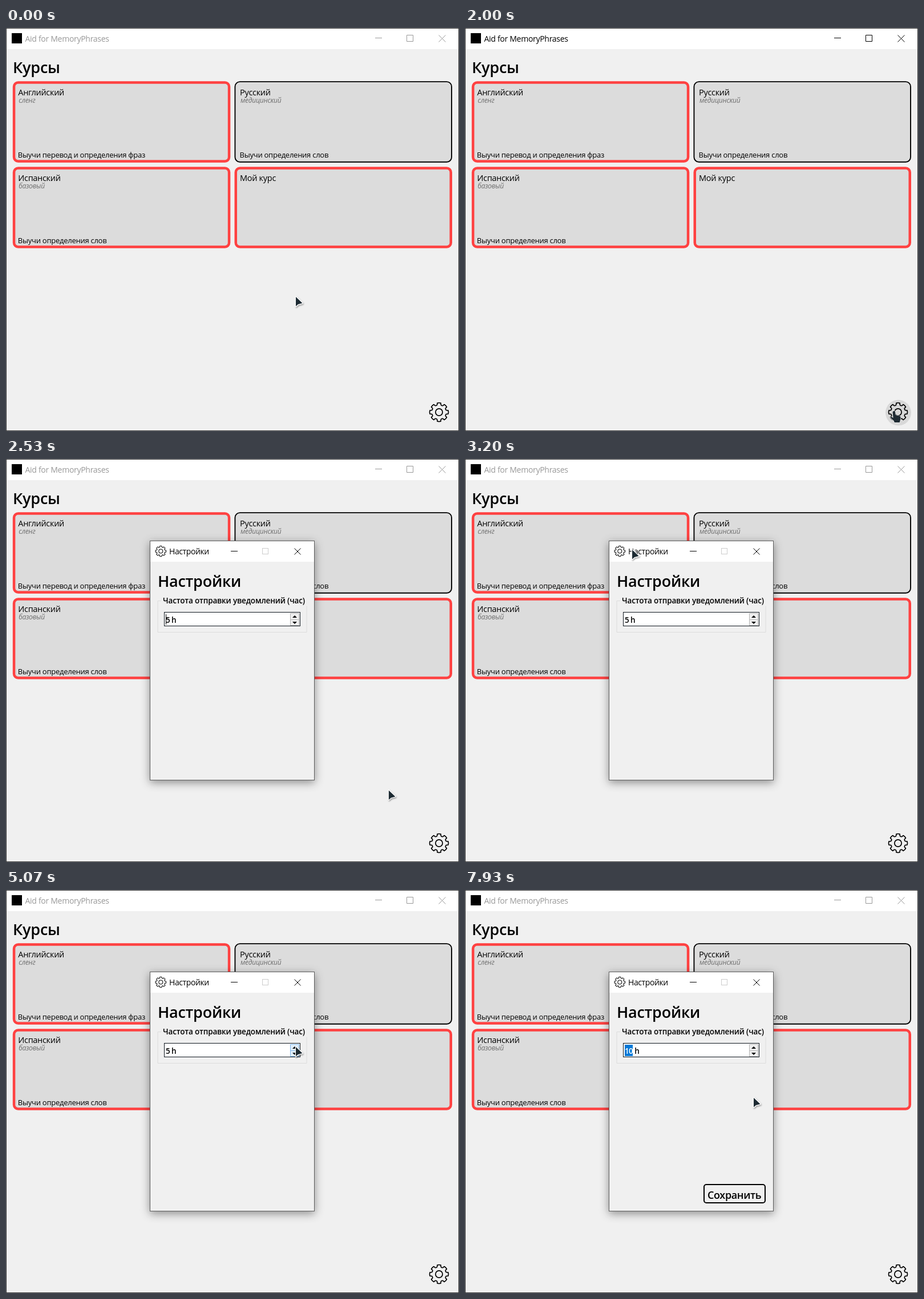
Animation of 794 by 706 pixels, one loop 8 s. Source, as an HTML page:

```html
<!DOCTYPE html>
<html lang="ru">
<head>
<meta charset="utf-8">
<title>Курсы</title>
<style>
html, body { margin: 0; width: 100%; height: 100%; overflow: hidden; background: #f0f0f0; }
svg { display: block; width: 794px; height: 706px; font-family: "Open Sans", "Noto Sans", sans-serif; }
text { white-space: pre; }
.bar { font-size: 14px; letter-spacing: -.3px; }
.head { font-size: 27px; font-weight: 600; letter-spacing: -.25px; }
.name { font-size: 14.5px; letter-spacing: -.3px; }
.sub { font-size: 12px; font-style: italic; letter-spacing: -.25px; fill: #6e6e6e; }
.task { font-size: 13px; letter-spacing: -.25px; }
.label { font-size: 13.5px; font-weight: 600; letter-spacing: -.15px; }
.value { font-size: 13.5px; font-weight: 600; letter-spacing: -.6px; }
.save { font-size: 18px; font-weight: 600; letter-spacing: -.35px; }
.line { fill: none; stroke-width: 1; }
</style>
</head>
<body>
<svg viewBox="0 0 794 706">
  <defs>
    <filter id="soft" x="-20%" y="-20%" width="140%" height="140%">
      <feDropShadow dx="0" dy="4" stdDeviation="8" flood-opacity=".42"/>
    </filter>
    <filter id="tiny" x="-50%" y="-50%" width="220%" height="220%">
      <feDropShadow dx="1" dy="1.5" stdDeviation="1.3" flood-opacity=".4"/>
    </filter>
  </defs>

  <rect width="794" height="706" fill="#f0f0f0"/>
  <rect width="794" height="37" fill="#fff"/>
  <rect x="10" y="9" width="18" height="18"/>
  <text class="bar" id="appTitle" x="33.5" y="24">Aid for MemoryPhrases</text>
  <path class="line" id="appButtons" d="M647 17.5h12M702.5 12.5h11v11h-11zM758.5 12.5l12 12m0-12l-12 12"/>
  <text class="head" x="12" y="78.500">Курсы</text>
  <g id="cards"></g>
  <circle id="halo" cx="759.5" cy="674" r="22.5" fill="#d8d8d8"/>
  <path id="gear" fill="none" stroke="#000" stroke-width="1.7" stroke-linejoin="round"/>
  <rect class="line" x=".5" y=".5" width="793" height="705" stroke="#333"/>

  <g id="dialog">
    <rect x="252.5" y="143.5" width="288" height="419" fill="#f0f0f0" stroke="#5c5c5c" filter="url(#soft)"/>
    <rect x="253" y="144" width="287" height="36" fill="#fff"/>
    <path id="smallGear" fill="none" stroke="#111" stroke-width="1.1" stroke-linejoin="round"/>
    <text class="bar" x="286" y="167" style="letter-spacing:-.4px">Настройки</text>
    <path class="line" stroke="#000" d="M394 161.5h12M505.5 156.5l11 11m0-11l-11 11"/>
    <rect class="line" x="449.5" y="156.5" width="10" height="10" stroke="#ccc"/>
    <text class="head" x="266" y="223.500">Настройки</text>
    <path class="line" stroke="#dcdcdc" d="M272 248.5h-6v55h261v-46"/>
    <text class="label" x="275" y="253">Частота отправки уведомлений (час)</text>
    <rect id="field" x="277.5" y="268.5" width="238" height="24" fill="#fff"/>
    <rect id="mark" x="280" y="271" height="20" fill="#0078d7"/>
    <text class="value" x="280" y="287"><tspan id="num"></tspan> h</text>
    <path class="line" id="caret" stroke="#000" d="M280.5 272v18"/>
    <g id="spin">
      <path d="M498.5 270.5h15v11h-15zM498.5 281.5h15v10h-15z"/>
      <path d="M502 278l4-4 4 4zM502 285l4 4 4-4z" stroke="none" fill="#000"/>
    </g>
    <g id="save">
      <rect x="419" y="516" width="107" height="32" rx="4" fill="#f0f0f0" stroke="#000" stroke-width="2"/>
      <text class="save" x="425" y="540.500">Сохранить</text>
    </g>
  </g>

  <g id="cursor">
    <g id="arrow" filter="url(#tiny)" stroke-linejoin="round">
      <path d="M0 0v16.500l4-3.500 7.500-2z" fill="#1f2b33" stroke="#fff" stroke-width="2.500" paint-order="stroke"/>
    </g>
    <path id="hand" fill="#1f2b33" stroke="#fff" stroke-width="1.2" paint-order="stroke"
      d="M-.5 0q2-1 2.500 1l.8 6 7 1.500q2 .5 1.800 3l-.8 5-1 3.500h-9l-1.300-3-5.500-5q-.8-2 1.500-2l3 2-1-10q0-1.500 2-2z"/>
    <path id="beam" fill="none" stroke="#333" stroke-width="1.2" d="M-3-9h2l1 1 1-1h2M0-8v16M-3 9h2l1-1 1 1h2"/>
  </g>
</svg>
<script>
const $ = id => document.getElementById(id);
const set = (id, attrs) => { for (const k in attrs) $(id).setAttribute(k, attrs[k]); };
const show = (id, on) => set(id, { display: on ? 'inline' : 'none' });
const clamp = v => Math.max(0, Math.min(1, v));

const LOOP = 8000;
const OPEN = 2250;
const CLICKS = [5270, 5670, 6130, 6600, 7000];
const PATH = [
  [0, 508, 471], [70, 508, 471], [870, 690, 566], [1070, 743, 633],
  [1330, 749, 656], [1730, 752, 671], [2400, 752, 671], [3130, 300, 166],
  [3200, 293, 159], [3400, 301, 172], [3930, 432, 293], [4800, 505, 280],
  [5070, 508, 275], [7270, 508, 275], [7930, 506, 364], [LOOP, 506, 364]
];

function gearPath(cx, cy, r) {
  const pt = (k, a) => [cx + r * k * Math.sin(a), cy - r * k * Math.cos(a)].map(v => v.toFixed(2)).join(' ');
  const step = Math.PI / 4, hub = r * .37;
  let d = '';
  for (let i = 0; i < 8; i++) {
    const a = i * step;
    d += (i ? 'L' : 'M') + pt(.8, a - .25) + 'L' + pt(.98, a - .19) + 'Q' + pt(1.02, a) + ' ' + pt(.98, a + .19)
      + 'L' + pt(.8, a + .25) + 'Q' + pt(.71, a + step / 2) + ' ' + pt(.8, a + step - .25);
  }
  return `${d}ZM${cx - hub} ${cy}a${hub} ${hub} 0 1 0 ${2 * hub} 0a${hub} ${hub} 0 1 0 ${-2 * hub} 0`;
}

function card(x, y, name, sub, task, plain) {
  const w = plain ? 1.9 : 4.5;
  return `<rect x="${x + w / 2}" y="${y + w / 2}" width="${381.5 - w}" height="${142.5 - w}" rx="${9.5 - w / 2}"
    fill="#dcdcdc" stroke="${plain ? '#000' : '#ff4141'}" stroke-width="${w}"/>
    <text class="name" x="${x + 9.5}" y="${y + 24.5}">${name}</text>
    <text class="sub" x="${x + 10.5}" y="${y + 38}">${sub}</text>
    <text class="task" x="${x + 9}" y="${y + 134}">${task}</text>`;
}

$('cards').innerHTML =
  card(11.8, 93.2, 'Английский', 'сленг', 'Выучи перевод и определения фраз') +
  card(400.5, 93.2, 'Русский', 'медицинский', 'Выучи определения слов', true) +
  card(11.8, 243.2, 'Испанский', 'базовый', 'Выучи определения слов') +
  card(400.5, 243.2, 'Мой курс', '', '');
set('gear', { d: gearPath(759, 673, 16.6) });
set('smallGear', { d: gearPath(271.3, 161.5, 9.4) });

function pointer(t) {
  const i = PATH.findIndex(p => p[0] > t);
  const [t0, x0, y0] = PATH[i - 1], [t1, x1, y1] = PATH[i];
  const p = (t - t0) / (t1 - t0);
  return [x0 + (x1 - x0) * p, y0 + (y1 - y0) * p];
}

function draw(t) {
  const [x, y] = pointer(t);
  const onGear = Math.hypot(x - 759.5, y - 674) < 22.5;
  const opened = t >= OPEN;
  const inField = opened && y >= 268 && y <= 294;
  const onText = inField && x >= 277 && x < 498;
  const onSpin = inField && x >= 498 && x <= 516;

  set('cursor', { transform: `translate(${x} ${y})` });
  show('arrow', !onGear && !onText);
  show('hand', onGear);
  show('beam', onText);
  show('halo', onGear);

  const active = t >= 2000 && t < OPEN;
  set('appTitle', { fill: active ? '#000' : '#999' });
  set('appButtons', { stroke: active ? '#000' : '#999' });

  const p = clamp((t - OPEN) / 200), s = .945 + .055 * p;
  show('dialog', opened);
  set('dialog', { opacity: p, transform: `translate(396.5 353) scale(${s}) translate(-396.5 -353)` });

  const value = 5 + CLICKS.filter(c => t >= c).length;
  const edited = value > 5;
  $('num').textContent = value;
  set('num', { fill: edited ? '#fff' : '#000' });
  set('mark', { width: value > 9 ? 14 : 7.5 });
  show('mark', edited);
  show('save', edited);
  show('caret', !edited && Math.floor((t - 2270) / 530) % 2 === 0);
  set('field', { stroke: t < 2500 ? '#0078d7' : '#10181f' });
  set('spin', { fill: onSpin ? '#e0eefb' : '#f0f0f0', stroke: onSpin ? '#7eb4ea' : '#b4b4b4' });
}

function tick() {
  draw(performance.now() % LOOP);
  requestAnimationFrame(tick);
}
tick();
</script>
</body>
</html>
```
